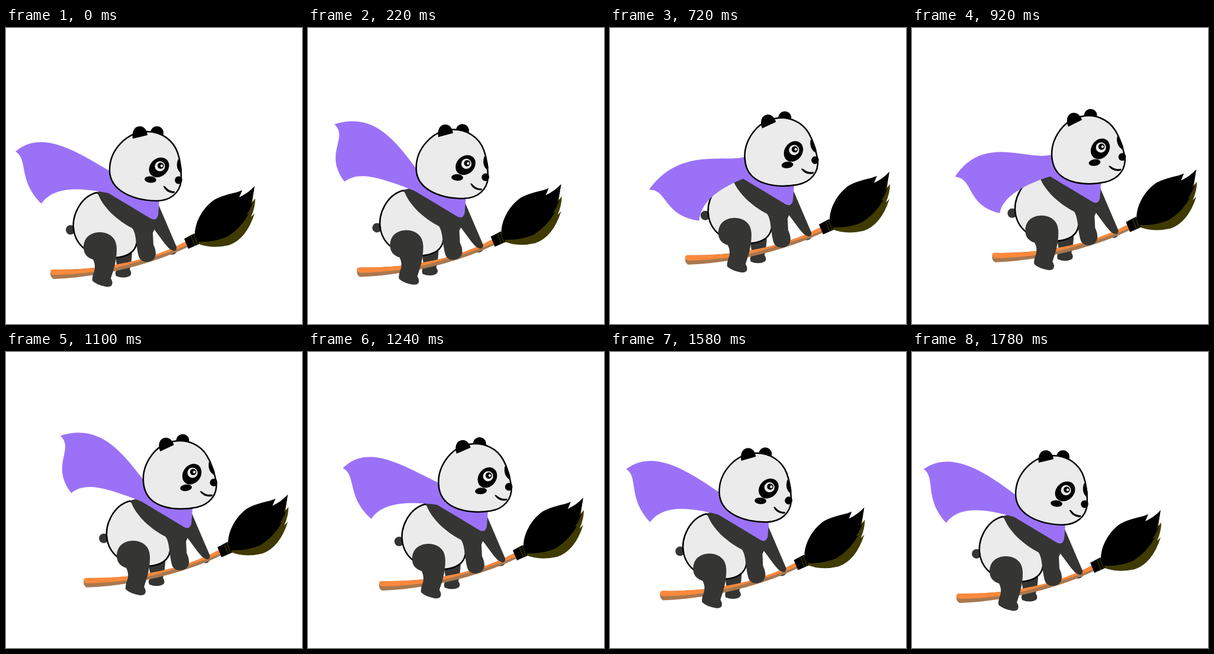
Recreate the animation shown at these times as an HTML page with a canvas. Size 500x500 px, loop 1.8 s.

```html
<!DOCTYPE html>
<html lang="en">
<head>
<meta charset="utf-8">
<title>Panda on a broom</title>
<style>
html, body { margin: 0; width: 100%; height: 100%; overflow: hidden; background: #fff; }
canvas { display: block; width: 100vw; height: 100vh; object-fit: contain; }
</style>
</head>
<body>
<canvas id="stage" width="500" height="500"></canvas>
<script>
const ctx = document.getElementById('stage').getContext('2d');
const LOOP = 1800, PEAK = 955;
const FUR = '#353533', WHITE = '#ebebeb', CAPE = '#9b72f7', BLACK = '#000', OLIVE = '#3f3a00';

const shape = (d, fill, line, ink = BLACK) => {
  const path = new Path2D(d);
  return () => {
    if (fill) { ctx.fillStyle = fill; ctx.fill(path); }
    if (line) { ctx.strokeStyle = ink; ctx.lineWidth = line; ctx.stroke(path); }
  };
};
const oval = (x, y, rx, ry, turn, fill) => () => {
  ctx.fillStyle = fill;
  ctx.beginPath();
  ctx.ellipse(x, y, rx, ry, turn, 0, Math.PI * 2);
  ctx.fill();
};
const drawAll = list => list.forEach(draw => draw());

const behind = [
  oval(109, 341, 8, 8, 0, FUR),
  oval(282, 378, 6.5, 4.5, -0.4, FUR),
  shape('M184 380L213 374Q213 392 209 408Q214 415 209 419Q199 424 186 419Q183 413 188 406Z', FUR),
  shape('M153 278C126 285 109 318 115 345C121 371 145 388 185 388C208 386 219 376 221 362C223 340 200 300 153 278Z', WHITE, 2.5)
];

const broom = [
  shape('M79 408C135 409 190 402 240 387Q275 376 303 361L307 370Q270 388 220 402C175 414 130 422 80 424Q75 421 75 415Q75 409 79 408Z', '#a9784f'),
  shape('M79 408C135 409 190 402 240 387Q275 376 303 361L306 367Q270 382 225 394C175 410 130 416 80 417Q75 415 75 412Q75 408 79 408Z', '#fb893c'),
  shape('M321 363Q345 374 376 367Q406 357 420 313L414 319Q421 303 421 288L416 294L419 272L370 300Z', OLIVE),
  shape('M319 352C318 328 333 303 352 290C370 280 386 280 399 274L394 286Q409 279 420 267Q418 281 413 298L417 294Q413 306 406 316L410 314Q397 338 373 353Q348 363 321 361Z', BLACK),
  shape('M301 356L318 347L326 365L308 373Z', BLACK),
  shape('M312.5 351L319 368M317 349L323.5 366', null, 1.4, OLIVE)
];

const limbs = [
  shape('M257 297L287 367Q290 372 286 376Q281 377 275 372L268 364L248 337Z', FUR),
  shape('M154 277C163 303 188 325 213 338C221 347 219 370 225 388Q229 396 240 395Q252 393 253 382Q253 374 249 366L248 346L262 315L245 295L180 270Z', FUR),
  shape('M131 371C131 353 144 345 159 345C178 346 187 357 187 373C187 395 181 410 177 423Q181 429 179 434Q176 438 169 437Q153 434 146 427Q145 421 149 411Q152 401 147 391C137 388 131 381 131 371Z', FUR)
];

const head = [
  oval(255, 177, 11, 11, 0, BLACK),
  shape('M238 175C263 175 283 190 290 211C295 225 296 240 296 257C294 278 278 292 254 292C215 291 175 275 175 240C175 205 205 175 238 175Z', WHITE, 2.5),
  shape('M214 187C212 175 217 166 226 166C234 166 238 173 239 181Z', BLACK),
  oval(258.5, 235.5, 18.5, 15, -0.75, BLACK),
  oval(260, 233.5, 8.6, 8.6, 0, WHITE),
  oval(261.3, 232.5, 5.3, 5.3, 0, BLACK),
  oval(263, 232.8, 2.2, 2.2, 0, WHITE),
  shape('M291 221C287 230 288 240 296 246L297 240Q296 228 291 221Z', BLACK),
  oval(291.5, 257, 6.3, 6.5, 0.3, BLACK),
  oval(244, 256, 10, 5.5, 0.08, BLACK),
  shape('M265.5 267Q268 266 270 269Q276 276 285 276Q286 279 282 279Q270 278 265.5 267Z', BLACK)
];

// Cape poses from raised to lowered: two top controls, tip, two side controls, corner, two hem controls
const LEVELS = [0, 0.33, 0.65, 1];
const POSES = [
  [140,195, 105,145, 37,166, 62,190, 18,215, 54,263, 75,248, 100,250],
  [128,215, 62,168, 16,209, 38,222, 20,258, 60,297, 78,270, 118,268],
  [130,244, 55,186, 11,251, 40,258, 24,302, 74,325, 82,304, 115,288],
  [140,252, 65,226, 14,298, 45,296, 38,342, 99,350, 101,322, 125,298]
];

function drawCape(p) {
  const weights = LEVELS.map((a, i) =>
    LEVELS.reduce((w, b, j) => i === j ? w : w * (p - b) / (a - b), 1));
  const c = POSES[0].map((_, k) => weights.reduce((sum, w, i) => sum + w * POSES[i][k], 0));
  ctx.fillStyle = CAPE;
  ctx.beginPath();
  ctx.moveTo(176, 242);
  ctx.bezierCurveTo(...c.slice(0, 6));
  ctx.bezierCurveTo(...c.slice(6, 12));
  ctx.bezierCurveTo(...c.slice(12, 16), 173, 279);
  ctx.quadraticCurveTo(200, 295, 243, 321);
  ctx.quadraticCurveTo(254, 328, 257, 316);
  ctx.lineTo(259, 290);
  ctx.lineTo(225, 260);
  ctx.closePath();
  ctx.fill();
}

const wave = u => (1 - Math.cos(Math.PI * u)) / 2;
const lift = t => wave(t < PEAK ? t / PEAK : (LOOP - t) / (LOOP - PEAK));

// Cape phase in half swings: whole even values are raised, odd ones lowered
const SWING = [[0, -0.39], [210, 0], [740, 1], [858, 1], [1120, 2], [1400, 3], [1680, 4], [1800, 4.39]];
function flutter(t) {
  const i = SWING.findIndex(k => k[0] > t);
  const [t0, a] = SWING[i - 1], [t1, b] = SWING[i];
  return wave(a + (b - a) * (t - t0) / (t1 - t0));
}

function render(t) {
  const e = lift(t);
  ctx.clearRect(0, 0, 500, 500);
  ctx.save();
  ctx.translate(60.5 * e, -28.3 * e);
  drawAll(behind);
  drawAll(broom);
  drawAll(limbs);
  drawCape(flutter(t));
  ctx.translate(244, 237);
  ctx.rotate(-0.225 * e);
  ctx.translate(-244, -237);
  drawAll(head);
  ctx.restore();
}

const start = performance.now();
function tick() {
  render(Math.max(0, performance.now() - start) % LOOP);
  requestAnimationFrame(tick);
}
tick();
</script>
</body>
</html>
```
